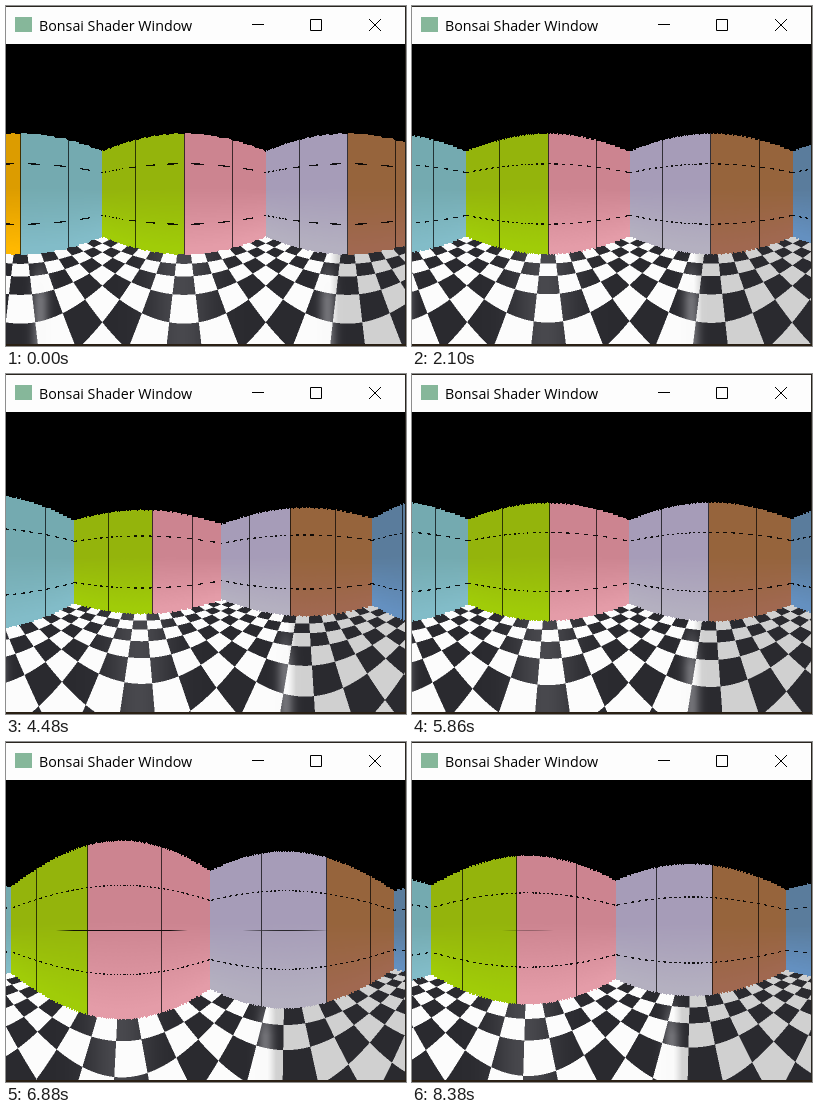
Animation of 400 by 340 pixels, one loop 8400 ms. Source, as an HTML page with a canvas:

```html
<!DOCTYPE html>
<html lang="en">
<head>
<meta charset="utf-8">
<title>Bonsai Shader Window</title>
<style>
html, body { margin: 0; width: 100%; height: 100%; overflow: hidden; background: #000; }
#stage { position: relative; width: 400px; height: 340px; overflow: hidden; }
canvas { position: absolute; left: 0; top: 38px; }
svg { position: absolute; left: 0; top: 0; }
text { font: 14.25px "Open Sans", "Noto Sans", sans-serif; fill: #000; }
</style>
</head>
<body>
<div id="stage">
  <canvas id="view" width="400" height="300"></canvas>
  <svg width="400" height="340" viewBox="0 0 400 340">
    <rect width="400" height="38" fill="#fdfdfd"/>
    <rect width="400" height="1" fill="#2a2620"/>
    <rect x="399" width="1" height="340" fill="#2a2620"/>
    <rect y="338" width="400" height="2" fill="#2a2014"/>
    <rect x="9" y="11" width="17" height="15" fill="#86b79a"/>
    <text x="33" y="25">Bonsai Shader Window</text>
    <path d="M246 18.5H258M304.5 13.5H315.5V24.5H304.5ZM363 13L375 25M375 13L363 25" fill="none" stroke="#000"/>
  </svg>
</div>
<script>
const W = 400, VIEW_H = 300, LOOP = 8400;
const SCALE = 104.1;      // pixels per radian
const HALF_H = 0.581;     // half the wall height; the room spans -1..1
const TILES = 15;
const TEX_X = 128, TEX_Y = 64;  // texels per unit of a cube face
const QUARTER = Math.PI / 2;

// two halves per wall, clockwise from north: colours at top and bottom
const shades = [
  "94b40c a0cc08", "cc8490 e49ca8", "a69cb8 b4b0c0", "96643c a06850",
  "5a7c9c 6490c0", "5a7c9c 6490c0", "dc9c00 ffb800", "74aab0 82bcc8"
].map(s => s.split(" ").map(h => [0, 2, 4].map(i => parseInt(h.substr(i, 2), 16))));

const clamp = (v, a = 0, b = 1) => Math.min(b, Math.max(a, v));
const mix = (a, b, k) => a + (b - a) * k;
const bell = (v, mid, width) => Math.exp(-(((v - mid) / width) ** 2));

const ctx = document.getElementById("view").getContext("2d");
const img = ctx.createImageData(W, VIEW_H);
const px = img.data;

// distance covered at a steady rate (per second) while a control is held
const held = (t, rate, ...spans) =>
  spans.reduce((sum, [a, b]) => sum + clamp(t - a, 0, b - a) * rate / 1000, 0);

function pose(t) {
  const head = .211
    + held(t, .287, [20, 860], [920, 1120])
    + held(t, .41, [1380, 1520], [1680, 1800])
    + held(t, 1.25, [6566, 6720]);
  const first = held(t, -.225, [2080, 2260], [2660, 2800])
    + held(t, -.178, [3200, 3660], [3920, 4180])
    + held(t, .705, [4920, 5160], [5860, 6180], [6280, 6566]);
  const second = held(t, -.175, [6980, 7280], [7440, 8280]);
  return { head, x: .58 * first + .725 * second, z: .815 * first + .688 * second };
}

// nearest wall along a bearing
function hitWall(cam, az) {
  const sx = Math.sin(az), sz = Math.cos(az);
  const tx = ((sx > 0 ? 1 : -1) - cam.x) / sx;
  const tz = ((sz > 0 ? 1 : -1) - cam.z) / sz;
  const dist = Math.min(tx, tz);
  const x = cam.x + sx * dist, z = cam.z + sz * dist;
  let side, u;
  if (tz < tx) [side, u] = sz > 0 ? [0, x] : [2, -x];
  else [side, u] = sx > 0 ? [1, -z] : [3, z];
  return { dist, side, u };
}

function put(o, r, g, b) {
  px[o] = r; px[o + 1] = g; px[o + 2] = b; px[o + 3] = 255;
}

function wallPixel(o, [top, bottom], v, ink) {
  const k = clamp(v + .1), lit = 1 - ink;
  put(o, ...top.map((c, i) => mix(c, bottom[i], k) * lit));
}

const tile = c => clamp(Math.floor((c + 1) * TILES / 2), 0, TILES - 1);

function floorPixel(o, cam, rays, y, az) {
  let light = 0;
  for (let j = 0; j < 2; j++) {
    const dist = HALF_H * SCALE / (y + .25 + j * .5);
    for (const r of rays) {
      light += (tile(cam.x + r[0] * dist) + tile(cam.z + r[1] * dist) + 1) % 2;
    }
  }
  light /= 4;
  const near = clamp((y - 60) / 45);
  const grey = 42 + bell(az, -.03, .3) * 30;
  const white = mix(252, 208, clamp((az - 1.4) / .08));
  const glow = .35 * near * bell(Math.abs(az), 1.38, .08);
  const tone = mix(mix(grey, white, light), 245, glow);
  put(o, tone, tone, tone + 5 * (1 - light));
}

function draw(t) {
  const cam = pose(t);
  let left = hitWall(cam, cam.head - W / 2 / SCALE);
  for (let x = 0; x < W; x++) {
    const rel = (x + .5 - W / 2) / SCALE;
    const az = cam.head + rel;
    const face = Math.round(rel / QUARTER) * QUARTER;
    const cosA = Math.cos(rel - face);
    const bend = Math.atan((Math.floor(Math.tan(rel - face) * TEX_X) + .5) / TEX_X);
    const cosB = Math.cos(bend);
    const edge = hitWall(cam, cam.head + face + bend);
    const hit = hitWall(cam, az);
    const right = hitWall(cam, az + .5 / SCALE);
    const paint = shades[hit.side * 2 + (hit.u < 0 ? 0 : 1)];
    const rays = [-.25, .25].map(d => {
      const a = az + d / SCALE;
      return [Math.sin(a), Math.cos(a)];
    });

    // upright lines at every half unit; level lines break up with the texel rows
    const crossed = left.side === right.side && Math.floor(left.u * 2) !== Math.floor(right.u * 2);
    const upright = crossed ? .7 : 0;
    const level = .5 * HALF_H * SCALE / hit.dist;
    const phase = level / SCALE / cosA * TEX_Y;
    const dash = Math.abs(phase - Math.floor(phase) - .5) < .23;
    left = right;

    for (let row = 0; row < VIEW_H; row++) {
      const o = (row * W + x) * 4;
      const y = row - VIEW_H / 2;
      const texY = (Math.floor((y + .5) / SCALE / cosA * TEX_Y) + .5) / TEX_Y;
      const v = texY * cosB * edge.dist / HALF_H;
      if (v < -1) put(o, 0, 0, 0);
      else if (v > 1) floorPixel(o, cam, rays, y, az);
      else {
        let ink = upright;
        if (dash && Math.abs(Math.abs(y + .5) - level) < .6) ink = .9;
        if (y === 0) ink = Math.max(ink, clamp((.84 - hit.dist) * 12) * .9);
        wallPixel(o, paint, v, ink);
      }
    }
  }
  ctx.putImageData(img, 0, 0);
}

const start = performance.now();
function tick() {
  draw((performance.now() - start) % LOOP);
  requestAnimationFrame(tick);
}
tick();
</script>
</body>
</html>
```
